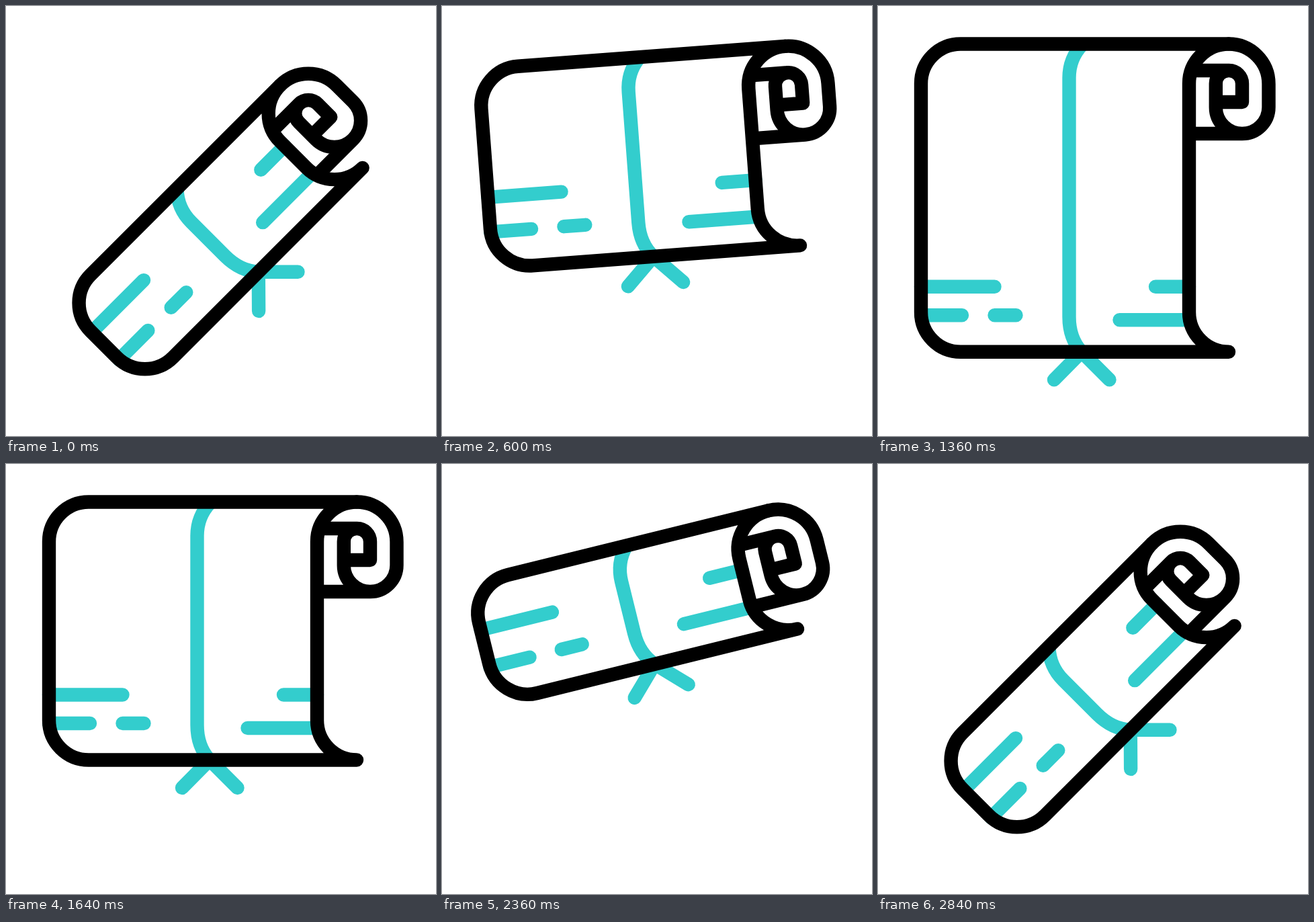
An HTML page with a canvas that plays this animation: 640 by 640 pixels, repeating every 3000 ms.

```html
<!DOCTYPE html>
<html lang="en">
<head>
<meta charset="utf-8">
<title>Scroll</title>
<style>
  html, body { margin: 0; width: 100%; height: 100%; overflow: hidden; background: #fff; }
  canvas { display: block; width: 640px; height: 640px; }
</style>
</head>
<body>
<canvas id="stage" width="640" height="640"></canvas>
<script>
const ctx = document.getElementById('stage').getContext('2d');
const LOOP = 3000, STEP = 40;
const TOP = 56.5, OPEN = 552.5, CLOSED = 230, DIP = 116;
const LEFT = 64, EDGE = 463, RIGHT = 581.5, R = 59;
const INK = '#000', TEAL = '#33cdcd';

const clamp = x => Math.min(1, Math.max(0, x));
const smooth = s => s * s * (3 - 2 * s);
const span = (t, from, to) => clamp((t - from) / (to - from));

// Cubic bezier easing with handles (1/3, 0) and (0.2, 1).
function ease(x) {
  let lo = 0, hi = 1;
  for (let i = 0; i < 24; i++) {
    const s = (lo + hi) / 2, r = 1 - s;
    if (s * r * r + 0.6 * s * s * r + s * s * s < x) lo = s; else hi = s;
  }
  return smooth(lo);
}

function pose(t) {
  const turn = t < 1900 ? 1 - ease(span(t, 200, 831)) : ease(span(t, 2201, 2840));
  const rolled = t < 1900 ? 1 - ease(span(t, 446, 1000)) : ease(span(t, 2000, 2450));
  const dip = smooth(span(t, 1000, 1230)) - smooth(span(t, 1230, 1440))
            + smooth(span(t, 1440, 1620)) - smooth(span(t, 1620, 1800));
  return { turn, rolled, bottom: OPEN + (CLOSED - OPEN) * rolled - DIP * dip };
}

function stroke(color, trace) {
  ctx.strokeStyle = color;
  ctx.beginPath();
  trace();
  ctx.stroke();
}

function line(x1, y1, x2, y2) {
  ctx.moveTo(x1, y1);
  ctx.lineTo(x2, y2);
}

function drawTeal(b, rolled) {
  stroke(TEAL, () => {
    line(LEFT, b - 97 - 15 * rolled, 173.5, b - 97 - 15 * rolled);
    line(LEFT, b - 54.5, 125, b - 54.5);
    line(173.5, b - 54.5, 205.5, b - 54.5);
    line(413, b - 97 - 8 * rolled, EDGE, b - 97 - 8 * rolled);
    line(359.5, b - 47.5, EDGE, b - 47.5);
    // ribbon and its two ends
    ctx.moveTo(304, TOP + 1);
    ctx.quadraticCurveTo(284.5, 78, 284.5, 107);
    ctx.lineTo(284.5, b - 52);
    ctx.quadraticCurveTo(284.5, b - 20, 303, b);
    ctx.lineTo(344.5, b + 41.5);
    line(303, b, 262, b + 41.5);
  });
}

function drawSheet(b) {
  stroke(INK, () => {
    ctx.moveTo(522, b);
    ctx.arcTo(LEFT, b, LEFT, TOP, R);
    ctx.arcTo(LEFT, TOP, 522, TOP, R);
    ctx.lineTo(522, TOP);
    ctx.arcTo(EDGE, TOP, EDGE, b, R);
    ctx.arcTo(EDGE, b, 522, b, R);
    ctx.lineTo(522, b);
  });
}

function drawCurl() {
  stroke(INK, () => {
    ctx.moveTo(522, TOP);
    ctx.arcTo(RIGHT, TOP, RIGHT, 150, 59.5);
    ctx.arcTo(RIGHT, 190, 542, 190, 39.5);
    ctx.lineTo(EDGE + 4, 190);
    // inner winding
    ctx.moveTo(542, 190);
    ctx.arcTo(502.8, 190, 502.8, 150, 39.2);
    ctx.arcTo(502.8, 96, 522, 96, 19.2);
    ctx.moveTo(EDGE + 4, 96);
    ctx.arcTo(542, 96, 542, 143, 19.5);
    ctx.lineTo(542, 143);
    ctx.lineTo(502.8, 143);
  });
}

function draw(t) {
  const { turn, rolled, bottom } = pose(t);
  ctx.fillStyle = '#fff';
  ctx.fillRect(0, 0, 640, 640);
  ctx.save();
  ctx.translate(508 - 41.7 * turn, 153 + 43.3 * turn);
  ctx.rotate(-Math.PI / 4 * turn);
  ctx.translate(-508, -153);
  ctx.lineWidth = 20.4;
  ctx.lineCap = ctx.lineJoin = 'round';
  drawTeal(bottom, rolled);
  drawSheet(bottom);
  drawCurl();
  ctx.restore();
}

const start = performance.now();
function frame() {
  const t = (performance.now() - start) % LOOP;
  draw(Math.floor(t / STEP) * STEP);
  requestAnimationFrame(frame);
}
frame();
</script>
</body>
</html>
```
